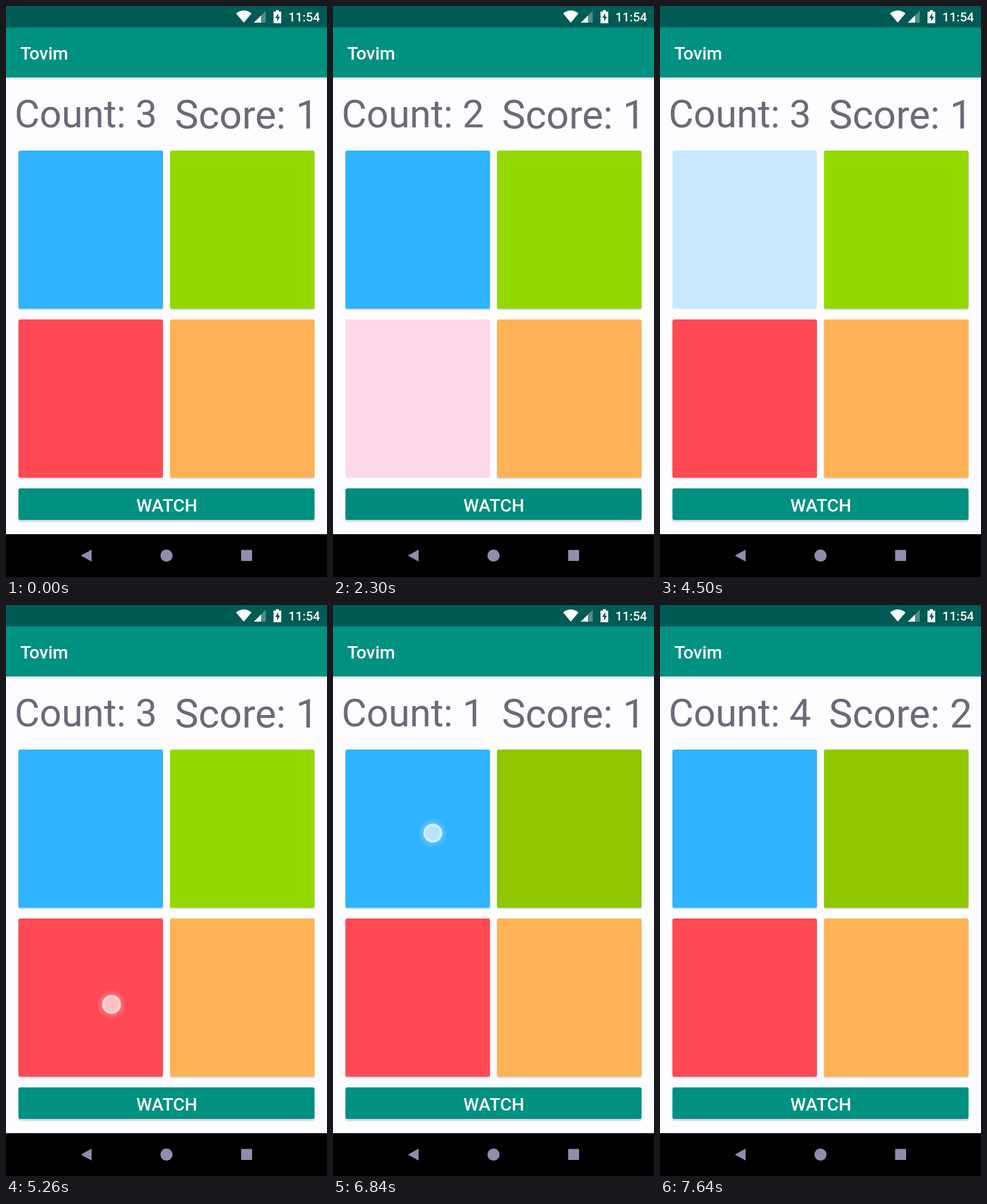
An HTML page for the animation above (7.94 s loop, 540 by 960 pixels).

```html
<!DOCTYPE html>
<html lang="en">
<head>
<meta charset="utf-8">
<title>Memory game</title>
<style>
html, body { margin: 0; width: 100%; height: 100%; overflow: hidden; background: #fdfdff; }
svg { display: block; width: 540px; height: 960px; font-family: Roboto, sans-serif; }
.medium { font-weight: 500; fill: #fff; }
.stat { fill: #6b6a78; }
</style>
</head>
<body>
<svg id="stage" viewBox="0 0 540 960">
  <defs>
    <linearGradient id="drop" x2="0" y2="1">
      <stop offset="0" stop-color="#c9d6de"/>
      <stop offset="1" stop-color="#fdfdff"/>
    </linearGradient>
    <radialGradient id="halo">
      <stop offset=".6" stop-color="#fff" stop-opacity=".22"/>
      <stop offset="1" stop-color="#fff" stop-opacity="0"/>
    </radialGradient>
  </defs>
  <rect width="540" height="960" fill="#fdfdff"/>
  <rect width="540" height="36" fill="#005b54"/>
  <rect y="36" width="540" height="84" fill="#009180"/>
  <rect y="120" width="540" height="5" fill="url(#drop)"/>

  <path d="M400 28L387 12.500Q400 2.500 413 12.500Z" fill="#fff"/>
  <path d="M417 28L437 8V28Z" fill="#4d8d88"/>
  <path d="M417 28L429 16V28Z" fill="#fff"/>
  <path d="M454 7h5v2.500h4v19.500h-13v-19.500h4z" fill="#fff"/>
  <path d="M458 12l-5 8h3v6l5-8h-3z" fill="#005b54"/>
  <text class="medium" x="475" y="26" font-size="21">11:54</text>
  <text class="medium" x="24" y="90" font-size="30">Tovim</text>

  <text class="stat" id="count" x="14.4" y="204" font-size="64.7"></text>
  <text class="stat" id="score" x="283.9" y="206" font-size="67"></text>
  <g id="buttons"></g>
  <text class="medium" x="270.5" y="850" font-size="30" text-anchor="middle">WATCH</text>

  <rect y="888" width="540" height="72" fill="#000"/>
  <g fill="#908eab">
    <path d="M126 924L144 914V934Z"/>
    <circle cx="270" cy="924" r="10.200"/>
    <rect x="395.500" y="914.500" width="18.500" height="18.500" rx="1"/>
  </g>
  <g id="dot">
    <circle r="25" fill="url(#halo)"/>
    <circle r="16" fill="#fff" fill-opacity=".55"/>
    <circle r="13.700" fill="none" stroke="#fff" stroke-width="3.600" stroke-opacity=".4"/>
  </g>
</svg>
<script>
const LOOP = 7940;
const NS = "http://www.w3.org/2000/svg";
const byId = id => document.getElementById(id);
const clamp = v => Math.max(0, Math.min(1, v));
const ramp = (t, from, to) => clamp((t - from) / (to - from));
const easeOut = p => 1 - (1 - p) ** 2;

function add(parent, tag, attrs) {
  const node = document.createElementNS(NS, tag);
  set(node, attrs);
  parent.append(node);
  return node;
}
function set(node, attrs) {
  for (const key in attrs) node.setAttribute(key, attrs[key]);
}

// lit: [on, off]; tap: finger position, press, release and end of the ripple
const buttons = [
  { x: 21, y: 243, w: 243, h: 266, fill: "#30b4ff", bright: "#c8e8ff",
    lit: [4500, 4730], tap: { x: 168, y: 383.5, down: 6830, up: 6930, end: 7500 } },
  { x: 276, y: 243, w: 243, h: 266, fill: "#93d900", bright: "#d9fbb9",
    lit: [3620, 3840], tap: { x: 396, y: 392, down: 6090, up: 6190, end: 6800 },
    ink: "#90c800", inkAlpha: 1, keep: true },
  { x: 21, y: 527, w: 243, h: 266, fill: "#ff4a55", bright: "#fdd8ea",
    lit: [2300, 2740], tap: { x: 177.5, y: 671.5, down: 5260, up: 5360, end: 5960 } },
  { x: 276, y: 527, w: 243, h: 266, fill: "#ffb356" },
  { x: 21, y: 811, w: 498, h: 53, fill: "#009180", depth: 4,
    tap: { x: 300, y: 838, down: 1590, up: 1960, end: 2570 } }
];

const counts = [[0, 3], [2300, 2], [3620, 1], [4500, 3], [5380, 2], [6210, 1], [6950, 4]];
const scores = [[0, 1], [7640, 2]];
const valueAt = (steps, t) => steps.filter(s => s[0] <= t).pop()[1];

buttons.forEach((b, i) => {
  const g = add(byId("buttons"), "g", {});
  const box = { x: b.x, y: b.y, width: b.w, height: b.h, rx: 3 };
  b.shadow = [0, 1].map(() => add(g, "rect", { rx: 4, fill: "#7f86b4" }));
  b.face = add(g, "rect", box);
  if (!b.tap) return;
  const clip = add(g, "clipPath", { id: "clip" + i });
  add(clip, "rect", box);
  b.ripple = add(g, "circle", {
    cx: b.tap.x, cy: b.tap.y, fill: b.ink || "#000", "clip-path": `url(#clip${i})`
  });
  b.reach = Math.hypot(
    Math.max(b.tap.x - b.x, b.x + b.w - b.tap.x),
    Math.max(b.tap.y - b.y, b.y + b.h - b.tap.y));
});

function drawButton(b, t) {
  const lit = b.lit && t >= b.lit[0] && t < b.lit[1];
  set(b.face, { fill: lit ? b.bright : b.fill });

  let lift = 0;
  if (b.tap) {
    const { down, up, end } = b.tap;
    lift = ramp(t, down, down + 120) * (1 - ramp(t, up + 100, up + 300));
    const grow = easeOut(ramp(t, down, down + 300));
    const fade = b.keep ? 1 : 1 - ramp(t, Math.max(up, down + 250), end);
    set(b.ripple, {
      r: 20 + grow * (b.reach - 20),
      opacity: t < down ? 0 : (b.inkAlpha || 0.08) * fade * ramp(t, down, down + 120)
    });
  }
  b.shadow.forEach((s, k) => {
    const depth = (b.depth || 2.5) * (k ? 0.6 : 1) + lift * (k ? 2 : 4);
    const side = 0.5 + lift * (k ? 0.5 : 1.5);
    set(s, {
      x: b.x - side, y: b.y + 1, width: b.w + 2 * side, height: b.h - 1 + depth,
      opacity: lit ? 0 : k ? 0.2 : 0.16
    });
  });
}

function drawDot(t) {
  const hit = buttons.find(b => b.tap && t >= b.tap.down && t < b.tap.up + 150);
  if (!hit) return set(byId("dot"), { opacity: 0 });
  const { x, y, up } = hit.tap;
  set(byId("dot"), {
    transform: `translate(${x} ${y})`,
    opacity: 1 - ramp(t, up, up + 150)
  });
}

function draw(t) {
  byId("count").textContent = "Count: " + valueAt(counts, t);
  byId("score").textContent = "Score: " + valueAt(scores, t);
  buttons.forEach(b => drawButton(b, t));
  drawDot(t);
}

const start = performance.now();
function tick() {
  draw((performance.now() - start) % LOOP);
  requestAnimationFrame(tick);
}
tick();
</script>
</body>
</html>
```
